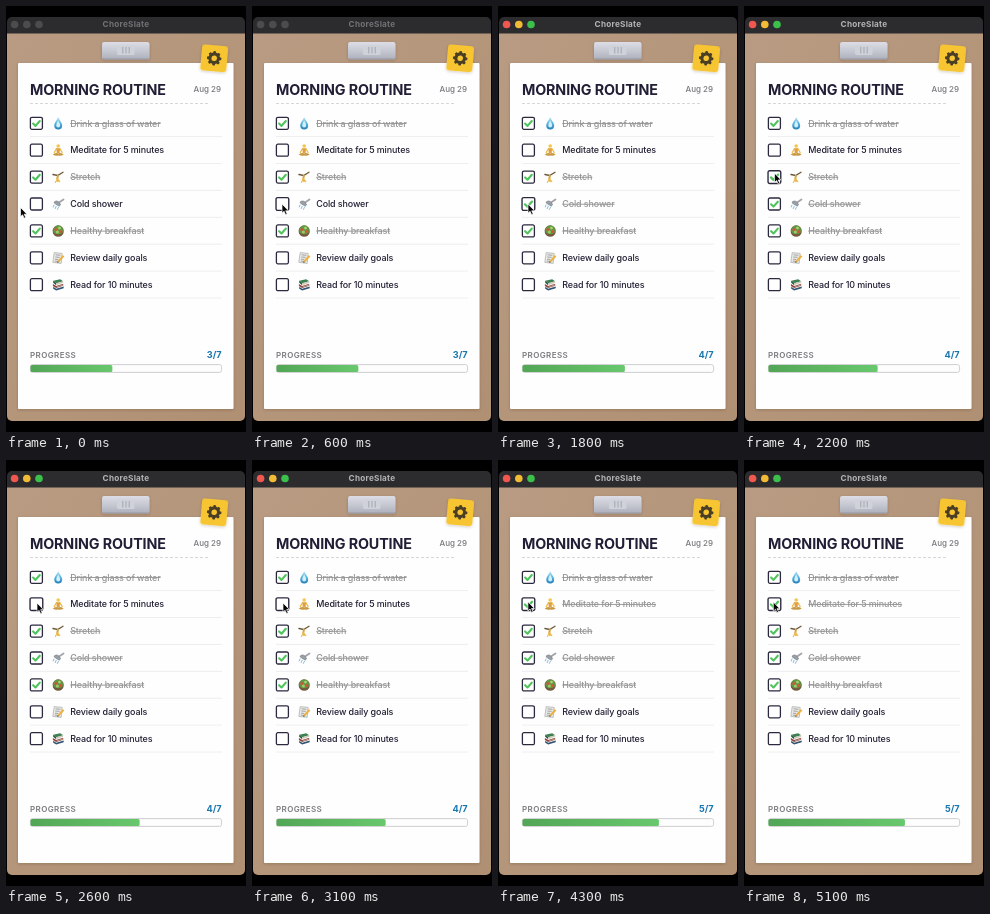
Animation, 240 px wide and 426 px high, one loop 5200 ms. Source, as an HTML page:

```html
<!DOCTYPE html>
<html lang="en">
<head>
<meta charset="utf-8">
<title>ChoreSlate</title>
<style>
html, body { margin: 0; width: 100%; height: 100%; overflow: hidden; background: #000; }
svg { display: block; width: 240px; height: 426px; font-family: Inter, sans-serif; }
.name { font-size: 8.2px; font-weight: 700; letter-spacing: .25px; }
.head { font-size: 14.3px; font-weight: 700; letter-spacing: -.12px; fill: #211e36; }
.date { font-size: 8px; font-weight: 500; fill: #77777c; }
.label { font-size: 8px; font-weight: 600; letter-spacing: .4px; fill: #7c7c80; }
.count { font-size: 9.2px; font-weight: 700; fill: #1976ae; }
.item { font-size: 8.95px; font-weight: 500; letter-spacing: -.1px; fill: #211e32; }
.done .item { fill: #949494; text-decoration: line-through; }
.tick { fill: none; stroke: #4fc45c; stroke-width: 2.1; stroke-linecap: round; stroke-linejoin: round; visibility: hidden; }
.done .tick { visibility: visible; }
</style>
</head>
<body>
<svg viewBox="0 0 240 426">
  <defs>
    <linearGradient id="metal" x2="0" y2="1">
      <stop stop-color="#dcdde5"/><stop offset=".5" stop-color="#c6c8d2"/><stop offset="1" stop-color="#adb0bb"/>
    </linearGradient>
    <linearGradient id="green">
      <stop stop-color="#52a656"/><stop offset="1" stop-color="#68c86c"/>
    </linearGradient>
    <linearGradient id="wood" x2="1" y2="1">
      <stop stop-color="#b89b82"/><stop offset="1" stop-color="#b09073"/>
    </linearGradient>
    <linearGradient id="water" x2="0" y2="1">
      <stop stop-color="#c9ecf8"/><stop offset=".5" stop-color="#58b5e2"/><stop offset="1" stop-color="#267fb8"/>
    </linearGradient>
    <filter id="soft" x="-20%" y="-20%" width="140%" height="150%">
      <feDropShadow dx="0" dy="1" stdDeviation="1.6" flood-color="#3a2413" flood-opacity=".22"/>
    </filter>
    <clipPath id="win"><rect x="1" y="11" width="238" height="404" rx="5"/></clipPath>
  </defs>

  <rect width="240" height="426" fill="#000"/>
  <g clip-path="url(#win)">
    <rect y="11" width="240" height="17" fill="#2c2b2e"/>
    <rect y="27.5" width="240" height="388" fill="url(#wood)"/>
  </g>
  <g id="lights">
    <circle cx="8.6" cy="18.5" r="3.8"/><circle cx="20.8" cy="18.5" r="3.8"/><circle cx="33" cy="18.5" r="3.8"/>
  </g>
  <text class="name" id="name" x="120" y="21.2" text-anchor="middle">ChoreSlate</text>

  <rect x="12" y="57" width="215.5" height="346" rx="1" fill="#fefefe" filter="url(#soft)"/>

  <rect x="96" y="36" width="47.5" height="17.5" rx="2.2" fill="url(#metal)" filter="url(#soft)"/>
  <path d="M97 52.9H142.5" stroke="#94969f" stroke-width=".8"/>
  <rect x="111" y="39.5" width="17.5" height="9.5" rx="1.5" fill="#d0d2da"/>
  <path d="M116.8 41v6.5M120 41v6.5M123.2 41v6.5" stroke="#a0a3ad" stroke-width=".9"/>

  <g transform="translate(208.2 52.3) rotate(5)">
    <rect x="-13" y="-13" width="26" height="26" rx="3" fill="#f8c530" filter="url(#soft)"/>
    <g id="gear" fill="#4a3f25"></g>
    <circle r="4.3" fill="none" stroke="#4a3f25" stroke-width="3"/>
  </g>

  <text class="head" x="24" y="88.5">MORNING ROUTINE</text>
  <text class="date" x="215" y="86.3" text-anchor="end">Aug 29</text>
  <path d="M24 97.5H204" stroke="#d3d3d6" stroke-width=".9" stroke-dasharray="3 2"/>
  <g id="list"></g>

  <text class="label" x="24" y="351.7">PROGRESS</text>
  <text class="count" id="count" x="215.7" y="352" text-anchor="end"></text>
  <rect x="24.4" y="358.6" width="191.2" height="7.8" rx="2.2" fill="#fdfdfd" stroke="#cbcbcd" stroke-width=".9"/>
  <rect id="bar" x="24.5" y="359" height="7" rx="1.6" fill="url(#green)"/>

  <path id="cursor" d="M0 0V9.2L2.1 7.3L3.6 10.7L5.2 10L3.7 6.7H6.5Z" fill="#050505" stroke="#fff" stroke-width=".7" stroke-linejoin="round"/>
</svg>

<script>
const $ = id => document.getElementById(id);
const LOOP = 5200, FOCUS = 1050, CHECKS = [1550, 3210];

// Icons sit in a 12 x 12 box centred on the origin.
const icons = {
  drop: `<path d="M0-6.4C1.2-3.2 4-.5 4 2.2A4 4 0 0 1-4 2.2C-4-.5-1.2-3.2 0-6.4Z" fill="url(#water)"/>
    <path d="M0-2.5C1.2-.8 1.9.8 1.9 2.2A1.9 2 0 0 1-1.9 2.2C-1.9.8-1.2-.8 0-2.5Z" fill="#d3eff9"/>`,
  lotus: `<path d="M-1.7-1.6L-4 2.4M1.7-1.6L4 2.4" stroke="#f0bb45" stroke-width="1.2" stroke-linecap="round"/>
    <path d="M-1.8-2H1.8L1.5 3H-1.5Z" fill="#dfa044"/>
    <path d="M-5.5 4.2Q-2 2 0 3.2Q2 2 5.5 4.2Q3 6 0 5.3Q-3 6-5.5 4.2Z" fill="#c79943"/>
    <circle cy="-4.2" r="1.8" fill="#f5c64a"/>`,
  flip: `<g fill="none" stroke-linecap="round"><path d="M-5.3-2.6L-.5-1.6L4.8-4.8" stroke="#6b5738" stroke-width="1.3"/>
    <path d="M-.3-1.4L-.9 1.6" stroke="#d9a544" stroke-width="2"/>
    <path d="M-.9 1.6L-2.8 5.4M-.9 1.6L1.6 4.6" stroke="#edb846" stroke-width="1.1"/></g>
    <circle cx="-.3" cy="3.6" r="1.2" fill="#edb846"/>`,
  shower: `<path d="M5.3-4.6L.8-1.4" stroke="#a2a6ac" stroke-width="1.8" stroke-linecap="round"/>
    <path d="M-3.6-2.4Q0-4.6 2.4.8L1 2.2L-4-1Z" fill="#9ba0a7" stroke="#70757d" stroke-width=".6"/>
    <path d="M-4.2 1L-5 3M-2 2.2L-3 4.6M.2 3.4L-.8 5.4" stroke="#86bddb" stroke-width="1" stroke-linecap="round"/>`,
  salad: `<circle r="5.6" fill="#6d6a3e"/><circle cy="-.6" r="4.8" fill="#5f9a45"/>
    <circle cx="-2.4" cy="-1.5" r="1.5" fill="#d0553c"/><circle cx="2.6" cy=".6" r="1.5" fill="#d0553c"/>
    <circle cx="1.3" cy="-2.8" r="1.4" fill="#a9d36c"/><circle cx="-.8" cy="1.2" r="1.5" fill="#a5c866"/>
    <path d="M-5.5 1.5Q0 5 5.5 1.5Q4 5.7 0 5.7T-5.5 1.5Z" fill="#74593f"/>`,
  memo: `<path d="M-4-5.2L4-4.4L3 5.6L-5.4 4.6Z" fill="#e9e9e5" stroke="#a9a9a5" stroke-width=".7"/>
    <path d="M-2.6-3L2.2-2.5M-2.9-.8L1.4-.4M-3.2 1.4L0 1.7M-3.4 3.3L-1 3.5" stroke="#858991" stroke-width=".7"/>
    <path d="M5.4-2L0 3.8" stroke="#eeb03e" stroke-width="2"/>
    <path d="M-.7 3.1L.8 4.4L-1 5Z" fill="#4b4238"/>`,
  books: `<path d="M-5-4L2-5.5L5-3.5L-2-1.5Z" fill="#3c8053"/><path d="M-5-4L-2-1.5V.5L-5-2Z" fill="#245737"/>
    <path d="M-2-1.5L5-3.5V-2L-2 .5Z" fill="#cfcabb"/>
    <path d="M-5.3-.8L-2 1.4L5-.9V1L-2 3.4L-5.3 1.2Z" fill="#8f4038"/>
    <path d="M-5 2L-2 4L5.5 1.8V3.6L-2 5.9L-5 4Z" fill="#2f5474"/><path d="M-1.6 2.3L5 .2" stroke="#cfcabb" stroke-width=".7"/>`
};

const items = [
  ['drop', 'Drink a glass of water'],
  ['lotus', 'Meditate for 5 minutes'],
  ['flip', 'Stretch'],
  ['shower', 'Cold shower'],
  ['salad', 'Healthy breakfast'],
  ['memo', 'Review daily goals'],
  ['books', 'Read for 10 minutes']
];

const rowY = i => 117.3 + i * 26.9;

$('list').innerHTML = items.map(([icon, label], i) => `
  <g class="row" transform="translate(0 ${rowY(i)})">
    <path d="M24 13.3H216" stroke="#eaeaec" stroke-width=".8"/>
    <g class="box">
      <rect x="-6" y="-6" width="12" height="12" rx="1.5" fill="#fff" stroke="#2c293f" stroke-width="1.3"/>
      <path class="tick" d="M-3.3 .3L-.9 2.6L3.4-2.3"/>
    </g>
    <g transform="translate(52.2 0)">${icons[icon]}</g>
    <text class="item" x="64.2" y="3.2">${label}</text>
  </g>`).join('');

$('gear').innerHTML = Array.from({ length: 8 }, (_, i) =>
  `<rect x="-1.4" y="-7.2" width="2.8" height="3" rx=".8" transform="rotate(${i * 45})"/>`).join('');

const rows = [...document.querySelectorAll('.row')];
const boxes = [...document.querySelectorAll('.box')];
const lights = [...$('lights').children];
const colors = ['#f0574f', '#f2bb36', '#3cc04c'];

const clamp = v => Math.max(0, Math.min(1, v));
const span = (t, start, length) => clamp((t - start) / length);
const easeOut = u => 1 - (1 - u) ** 2;
const smooth = u => u * u * (3 - 2 * u);

// Pointer stops: [start, duration, x, y]
const moves = [[0, 550, 30, 198], [1850, 650, 31, 143], [3050, 400, 31, 141.3], [4000, 500, 29.3, 142]];

function pointer(t) {
  let x = 14.5, y = 201.5;
  for (const [start, length, toX, toY] of moves) {
    const u = smooth(span(t, start, length));
    x += (toX - x) * u;
    y += (toY - y) * u;
  }
  return [x, y];
}

function draw(t) {
  const [x, y] = pointer(t);
  const focused = t >= FOCUS;
  $('cursor').setAttribute('transform', `translate(${x} ${y})`);
  $('name').setAttribute('fill', focused ? '#b4b3b6' : '#727174');
  lights.forEach((dot, i) => dot.setAttribute('fill', focused ? colors[i] : '#4c4b4e'));

  const done = [true, t >= CHECKS[1], true, t >= CHECKS[0], true, false, false];
  rows.forEach((row, i) => {
    row.classList.toggle('done', done[i]);
    const over = x > 23 && x < 38 && Math.abs(y - rowY(i)) < 7;
    boxes[i].setAttribute('transform', `translate(30.4 0) scale(${over ? 1.06 : 1})`);
  });
  $('count').textContent = `${done.filter(Boolean).length}/7`;

  const level = CHECKS.reduce((sum, at) => sum + easeOut(span(t, at, 500)), 3);
  $('bar').setAttribute('width', 191 * level / 7);
}

const begin = performance.now();
function tick() {
  draw((performance.now() - begin) % LOOP);
  requestAnimationFrame(tick);
}
draw(0);
requestAnimationFrame(tick);
</script>
</body>
</html>
```
